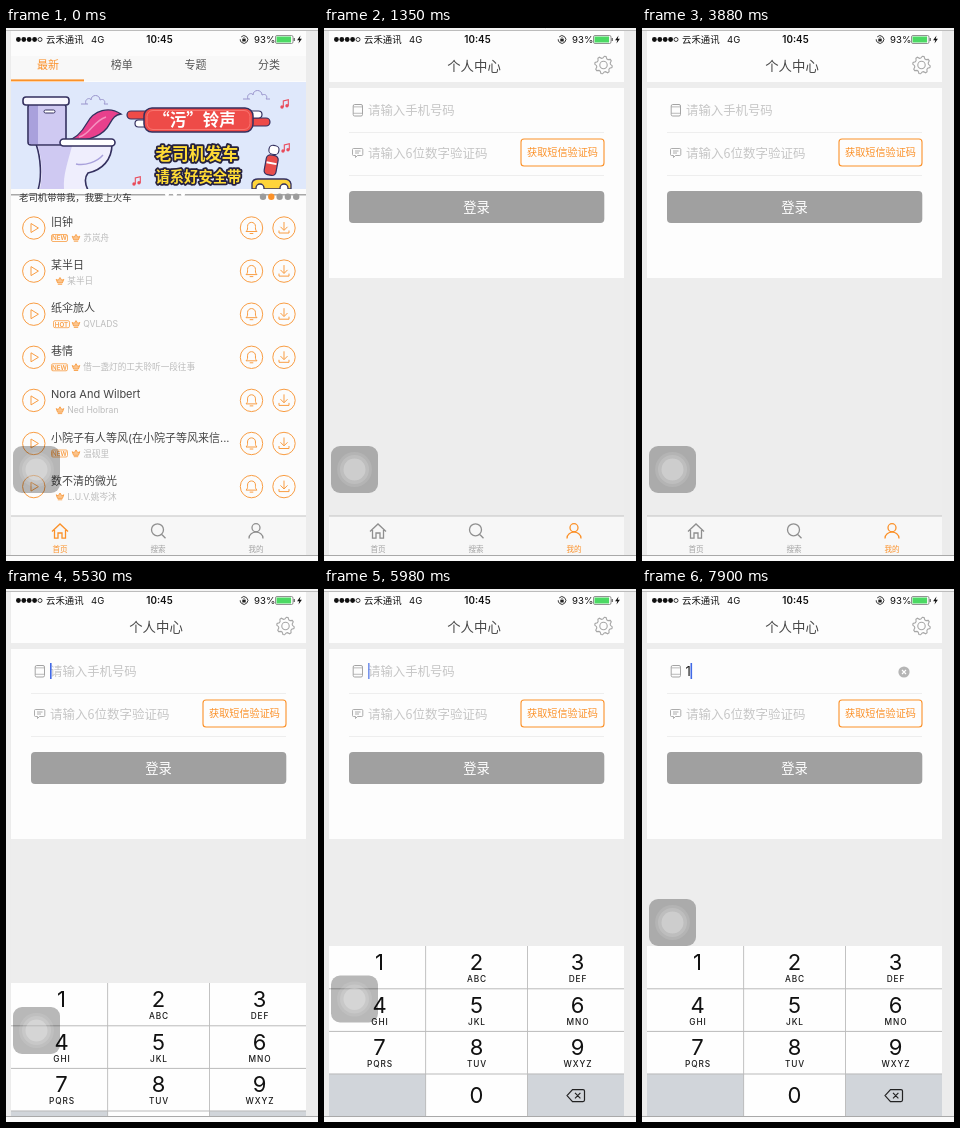
Recreate the animation shown at these times as an HTML page with a canvas. Size 312 by 533 pixels, loop 8 s.

```html
<!DOCTYPE html>
<html lang="zh-CN">
<head>
<meta charset="utf-8">
<title>铃声</title>
<style>
html, body { margin: 0; width: 100%; height: 100%; overflow: hidden; background: #ececec; }
canvas { display: block; width: 312px; height: 533px; }
</style>
</head>
<body>
<canvas id="stage"></canvas>
<script>
const W = 312, H = 533, LOOP = 8000;
const ORANGE = '#fb9129', RING = '#f99d43', GREY = '#8f8f8f', INK = '#34305f';
const HAN = '"Noto Sans CJK SC","Noto Sans CJK",sans-serif';
const LATIN = 'Inter,"Noto Sans CJK SC","Noto Sans CJK",sans-serif';
const canvas = document.getElementById('stage');
const dpr = window.devicePixelRatio || 1;
canvas.width = W * dpr;
canvas.height = H * dpr;
const c = canvas.getContext('2d');

function rect(x, y, w, h, fill) {
  c.fillStyle = fill;
  c.fillRect(x, y, w, h);
}

function paint(fill, stroke, width = 1) {
  if (fill) { c.fillStyle = fill; c.fill(); }
  if (stroke) { c.strokeStyle = stroke; c.lineWidth = width; c.stroke(); }
}

function round(x, y, w, h, r, fill, stroke, width) {
  c.beginPath();
  c.roundRect(x, y, w, h, r);
  paint(fill, stroke, width);
}

function circle(x, y, r, fill, stroke, width) {
  c.beginPath();
  c.arc(x, y, r, 0, Math.PI * 2);
  paint(fill, stroke, width);
}

function shape(x, y, d, fill, stroke, width) {
  c.save();
  c.translate(x, y);
  const p = new Path2D(d);
  if (fill) { c.fillStyle = fill; c.fill(p); }
  if (stroke) { c.strokeStyle = stroke; c.lineWidth = width || 1; c.stroke(p); }
  c.restore();
}

function text(s, x, y, size, color, align = 'left', font = HAN, weight = 400) {
  c.font = `${weight} ${size}px ${font}`;
  c.textAlign = align;
  c.fillStyle = color;
  c.fillText(s, x, y);
}

// Last entry [time, ...values] already reached
function at(steps, t) {
  let hit = null;
  for (const s of steps) if (t >= s[0]) hit = s;
  return hit;
}

function statusBar() {
  for (let i = 0; i < 5; i++) {
    const x = 12.4 + i * 5.4;
    if (i < 4) circle(x, 11.5, 2.4, '#111');
    else circle(x, 11.5, 2, null, '#111', 0.8);
  }
  text('云禾通讯', 40, 15, 9.4, '#111');
  text('4G', 85, 15, 9.5, '#111', 'left', LATIN);
  text('10:45', 153.5, 15, 9.8, '#111', 'center', LATIN, 600);
  c.beginPath();
  c.arc(238, 11.5, 3.8, -2.4, 3.2);
  paint(null, '#222', 0.9);
  rect(236.3, 11, 3.4, 2.5, '#222');
  c.beginPath();
  c.arc(238, 10.8, 1.1, Math.PI, 0);
  paint(null, '#222', 0.7);
  text('93%', 248, 15, 9.6, '#111', 'left', LATIN);
  round(269.5, 7.5, 17.5, 8, 1.5, '#fff', '#777', 0.8);
  rect(270.5, 8.5, 14.6, 6, '#4cd964');
  rect(287.6, 10, 1.2, 3, '#555');
  shape(293.5, 11.5, 'M1 -4L-2.4 .8H-.2L-1 4L2.4 -.8H.2Z', '#111');
}

function tabBar(active) {
  rect(5, 488, 295, 39, '#f7f7f7');
  rect(5, 487.5, 295, 1, '#c4c4c4');
  const icons = [
    'M-8 .5L0 -7L8 .5M-5.5 -1V7.2H-2V2H2V7.2H5.5V-1',
    'M5.5 -1.2A6 6 0 1 1 -6.5 -1.2A6 6 0 1 1 5.5 -1.2M3.6 3.2L7.5 7.2',
    'M4 -3.3A4 4 0 1 1 -4 -3.3A4 4 0 1 1 4 -3.3M-7 7.5C-7 -1 7 -1 7 7.5'
  ];
  ['首页', '搜索', '我的'].forEach((label, i) => {
    const x = 54 + i * 98, on = i === active;
    shape(x, 503, icons[i], null, on ? ORANGE : GREY, 1.3);
    text(label, x, 524, 7.6, on ? ORANGE : '#a2a2a2', 'center');
  });
}

function cloud(x, y) {
  shape(x, y, 'M-13 4H-6M-8 4C-10 -1 -4 -3 -3 0C-3 -6 6 -6 6 0C10 -2 12 2 10 4H14', null, '#9a95cd', 1);
}

function note(x, y, color) {
  circle(x, y, 1.7, color);
  circle(x + 5, y - 1.3, 1.7, color);
  shape(x, y, 'M1.3 0V-6L6.3 -7.3V-1.3', null, color, 1.1);
}

function outlined(s, x, y, size) {
  c.font = `900 ${size}px ${HAN}`;
  c.textAlign = 'left';
  c.lineJoin = 'round';
  c.strokeStyle = '#25213f';
  c.lineWidth = 3.6;
  c.strokeText(s, x, y);
  c.fillStyle = '#ffdc35';
  c.fillText(s, x, y);
  c.lineJoin = 'miter';
}

function toilet() {
  const shade = '#a9a1dc', lilac = '#cfc9f2';
  shape(0, 0, 'M30 116H106C106 132 96 142 82 145C78 150 79 156 82 162H32C36 150 35 130 30 116Z', '#efeefd', INK, 1.6);
  shape(0, 0, 'M32 118H66C62 134 57 146 58 161H34C37 148 36 132 32 118Z', lilac);
  shape(0, 0, 'M70 136C79 138 91 134 97 127', null, shade, 1.4);
  round(22, 76, 38, 41, 3, lilac, INK, 1.6);
  rect(23, 77, 9, 39, shade);
  round(17, 69, 46, 8, 3, '#f8f7ff', INK, 1.6);
  round(38, 82, 11, 3, 1.5, '#fff', INK, 1);
  shape(0, 0, 'M60 113C70 111 76 104 81 95C88 82 103 78 115 86C107 87 106 93 101 100C93 110 77 114 60 113Z', '#e8408c', INK, 1.3);
  shape(0, 0, 'M73 109C84 107 87 93 100 89', null, '#f591bf', 1.5);
  round(54, 111, 55, 7, 3.5, '#fff', INK, 1.6);
}

function ribbon() {
  const red = '#ee4b48';
  round(121, 83, 26, 8, 4, red, INK, 1.2);
  round(129, 92, 20, 7, 3.5, '#fff', INK, 1.2);
  round(238, 90, 26, 8, 4, red, INK, 1.2);
  round(236, 83, 20, 7, 3.5, '#fff', INK, 1.2);
  round(138, 80, 109, 24, 8, red, INK, 1.5);
  round(141, 82.5, 103, 19, 6, null, '#fb8179', 0.8);
  text('“污”铃声', 188.5, 98, 16.5, '#fff', 'center', HAN, 700);
}

function car() {
  c.save();
  c.translate(264, 138);
  c.rotate(0.18);
  round(-4, -21, 10, 9, 4, '#fff', INK, 1.1);
  round(-5, -11, 12, 20, 4, '#e84d4a', INK, 1.2);
  rect(-4, -4, 10, 2, '#fff');
  c.restore();
  shape(0, 0, 'M246 161V155Q247 151 252 151H278Q284 151 285 156V161Z', '#ffd43b', INK, 1.3);
  circle(254, 160, 4, '#fff', INK, 1.3);
  circle(278, 160, 4, '#fff', INK, 1.3);
}

function banner() {
  c.save();
  c.beginPath();
  c.rect(5, 54, 295, 107);
  c.clip();
  rect(5, 54, 295, 107, '#dfe8fb');
  cloud(88, 72);
  cloud(250, 67);
  toilet();
  ribbon();
  outlined('老司机发车', 149.5, 131.5, 16.6);
  outlined('请系好安全带', 149.5, 153.5, 14.3);
  car();
  note(276, 79, '#e94b5b');
  note(128, 156, '#e94b5b');
  note(277, 123, '#e94b5b');
  c.restore();
  rect(5, 166, 295, 1.5, '#a8a8a8');
  for (let i = 0; i < 3; i++) circle(161 + i * 8, 166.5, 2, '#fff');
  text('老司机带带我，我要上火车', 13, 173, 9.4, '#333');
  for (let i = 0; i < 5; i++) circle(257 + i * 8.3, 168.7, 3.2, i === 1 ? ORANGE : '#9c9c9c');
}

const songs = [
  ['旧钟', '苏岚舟', 'NEW'],
  ['某半日', '某半日', ''],
  ['纸伞旅人', 'QVLADS', 'HOT'],
  ['巷情', '借一盏灯的工夫聆听一段往事', 'NEW'],
  ['Nora And Wilbert', 'Ned Holbran', ''],
  ['小院子有人等风(在小院子等风来信...', '温砚里', 'NEW'],
  ['数不清的微光', 'L.U.V.姚岑沐', '']
];

function ringIcon(x, y, d) {
  circle(x, y, 11.2, null, RING, 1);
  shape(x, y, d, null, RING, 1);
}

function songRow([title, artist, tag], y) {
  ringIcon(27.8, y, 'M-2.8 -4.5L4.6 0L-2.8 4.5Z');
  text(title, 45, y - 2, 11, '#444', 'left', LATIN);
  let x = 54;
  if (tag) {
    const bx = tag === 'HOT' ? 47 : 45;
    round(bx + 0.5, y + 6.5, 16, 7, 1.5, null, RING, 0.8);
    text(tag, bx + 8.5, y + 12.4, 6.2, RING, 'center', LATIN, 600);
    x = 70;
  }
  shape(x, y + 10, 'M-3.8 -1.8L-1.8 -.8L0 -3.6L1.8 -.8L3.8 -1.8L2.4 1.8H-2.4ZM-2.2 3.2H2.2', '#fbc48d', RING, 0.9);
  text(artist, x + 7.3, y + 13, 8.6, '#bcbcbc', 'left', LATIN);
  ringIcon(245.5, y, 'M-5.5 3.5C-3.5 2 -4 0 -4 -1.5C-4 -7 4 -7 4 -1.5C4 0 3.5 2 5.5 3.5ZM-1.8 5.5H1.8');
  ringIcon(278, y, 'M0 -6V2M-3.5 -1.2L0 2.4L3.5 -1.2M-5 2.5V5H5V2.5');
}

function home() {
  rect(5, 3, 295, 485, '#fcfcfc');
  rect(5, 28, 295, 25, '#f8f8f8');
  ['最新', '榜单', '专题', '分类'].forEach((s, i) =>
    text(s, 42 + i * 73.7, 40.5, 11, i ? '#555' : ORANGE, 'center'));
  rect(5, 51.4, 73, 2, ORANGE);
  banner();
  songs.forEach((s, i) => songRow(s, 200 + i * 43.1));
  tabBar(0);
}

function gear(x, y) {
  c.beginPath();
  for (let i = 0; i < 32; i++) {
    const a = (i + 0.5) * Math.PI / 16, r = i % 4 < 2 ? 8.8 : 7;
    c.lineTo(x + r * Math.cos(a), y + r * Math.sin(a));
  }
  c.closePath();
  paint(null, '#a6a6a6', 1.1);
  circle(x, y, 3.7, null, '#a6a6a6', 1.1);
}

function login(t) {
  rect(5, 3, 295, 485, '#ededed');
  rect(5, 3, 295, 51, '#fdfdfd');
  rect(5, 60, 295, 190, '#fdfdfd');
  text('个人中心', 150, 42.5, 13.4, '#484848', 'center');
  gear(279.5, 37);
  round(29.2, 76.5, 9.3, 11.5, 1.5, null, '#a4a4a4', 1);
  rect(29.2, 78.5, 9.3, 0.8, '#a8a8a8');
  rect(29.2, 84.8, 9.3, 0.8, '#a8a8a8');
  shape(28, 120, 'M1.5 .5H9.8Q10.8 .5 10.8 1.5V6.5Q10.8 7.5 9.8 7.5H5.5L3.5 9.5V7.5H1.5Q.5 7.5 .5 6.5V1.5Q.5 .5 1.5 .5ZM3 3H8.5M3 5H7', null, '#a4a4a4', 0.9);
  if (t >= 7900) {
    text('1', 43.5, 87, 13, '#1a1a1a', 'left', LATIN);
    circle(262, 83, 5.6, '#b5b5b5');
    shape(262, 83, 'M-2 -2L2 2M2 -2L-2 2', null, '#fff', 1.1);
  } else {
    text('请输入手机号码', 44, 87, 12.4, '#c6c6c6');
  }
  text('请输入6位数字验证码', 44, 130, 12.5, '#c6c6c6');
  rect(25, 104, 255, 0.8, '#ebebeb');
  rect(25, 147, 255, 0.8, '#ebebeb');
  round(197, 111, 83, 27, 3, null, ORANGE, 1.1);
  text('获取短信验证码', 238.5, 128.3, 10.15, ORANGE, 'center', HAN, 500);
  round(25, 163, 255.3, 32, 4, '#a0a0a0');
  text('登录', 152.5, 184, 13.3, '#fff', 'center');
  tabBar(2);
}

function caret(t) {
  if (t < 5530) return;
  const typed = t >= 7900, phase = (t - 5530) % 1040;
  c.globalAlpha = typed || phase < 450 ? 1 : phase < 590 || phase >= 890 ? 0.7 : 0;
  rect(typed ? 48.5 : 44, 74, 1.6, 16, '#4169e6');
  c.globalAlpha = 1;
}

const slide = [[5530, 394], [5680, 364], [5830, 358], [5980, 357]];
const letters = ['', 'ABC', 'DEF', 'GHI', 'JKL', 'MNO', 'PQRS', 'TUV', 'WXYZ'];

function keyboard(t) {
  const step = at(slide, t);
  if (!step) return;
  const top = step[1], rowH = 42.6, side = '#d1d5da', line = '#bbb';
  const mid = [55.5, 152.5, 253.5];
  c.save();
  c.beginPath();
  c.rect(5, 0, 295, 527);
  c.clip();
  rect(5, top, 295, 171, '#fefefe');
  if (t >= 7750 && t < 7900) rect(5, top, 97, rowH, side);
  rect(5, top + rowH * 3, 97, rowH, side);
  rect(203, top + rowH * 3, 97, rowH, side);
  for (let i = 1; i < 4; i++) rect(5, top + rowH * i - 0.3, 295, 1, line);
  rect(101.2, top, 0.9, 171, line);
  rect(203, top, 0.9, 171, line);
  letters.forEach((s, i) => {
    const x = mid[i % 3], y = top + rowH * Math.floor(i / 3);
    text(i + 1, x, y + 24.2, 22, '#111', 'center', LATIN);
    c.letterSpacing = '0.9px';
    text(s, x + 0.5, y + 36, 8.3, '#1a1a1a', 'center', LATIN, 500);
    c.letterSpacing = '0px';
  });
  const y = top + rowH * 3;
  text('0', 152.5, y + 29.2, 22, '#111', 'center', LATIN);
  shape(252, y + 21.8, 'M-9 0L-3.5 -6H7Q8.5 -6 8.5 -4.5V4.5Q8.5 6 7 6H-3.5ZM-1 -2.7L4.4 2.7M4.4 -2.7L-1 2.7', null, '#222', 1.2);
  c.restore();
}

const floatY = [[0, 418], [5830, 412], [5980, 386.5], [6120, 310]];

function floatButton(t) {
  const y = at(floatY, t)[1];
  round(7, y, 47, 47, 9, 'rgba(0,0,0,.28)');
  circle(30.5, y + 23.5, 17.5, 'rgba(255,255,255,.1)');
  circle(30.5, y + 23.5, 14.5, 'rgba(255,255,255,.14)');
  circle(30.5, y + 23.5, 11, 'rgba(255,255,255,.24)');
}

const pointerPath = [
  [1350, 215, -17], [1500, 208.5, 110.5], [1640, 182.5, 115.5],
  [1790, 152.5, 91], [1940, 150.5, 87.5], [2090, 150, 86.5], [3730, 252.5, 222]
];

function pointer(t) {
  const p = at(pointerPath, t);
  if (!p || t >= 3880) return;
  shape(p[1], p[2], 'M.5 .5V15L3.8 12L6.2 17.4L8.6 16.4L6.2 11.2H10.8Z', '#000', '#fff', 1);
}

function draw(t) {
  c.setTransform(dpr, 0, 0, dpr, 0, 0);
  rect(0, 0, W, H, '#ececec');
  rect(0, 0, W, 2, '#f4f4f4');
  rect(0, 528, W, 5, '#fbfbfb');
  if (t < 300) home();
  else login(t);
  statusBar();
  caret(t);
  keyboard(t);
  floatButton(t);
  rect(0, 2, W, 1, '#bcbcbc');
  rect(0, 527, W, 1, '#a9a9a9');
  pointer(t);
}

const start = performance.now();
function tick() {
  draw((performance.now() - start) % LOOP);
  requestAnimationFrame(tick);
}
tick();
</script>
</body>
</html>
```
